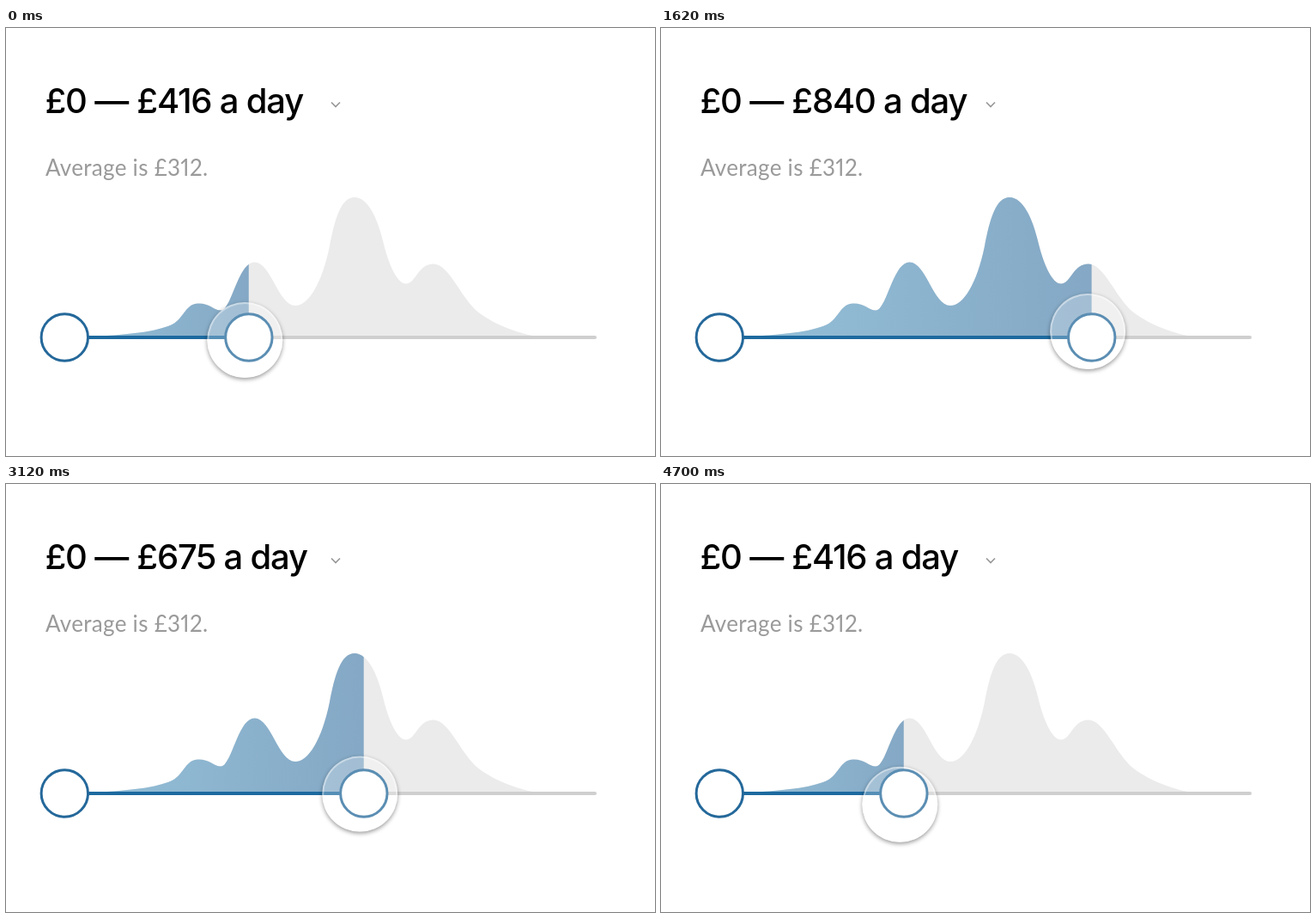
Write an HTML page that moves like this. It is 756 px wide and 498 px high and loops after 4720 ms.

```html
<!DOCTYPE html>
<html lang="en">
<head>
<meta charset="utf-8">
<title>Price range slider</title>
<style>
  html, body { margin: 0; width: 100%; height: 100%; overflow: hidden; background: #fff; }
  svg { position: absolute; left: 0; top: 0; }
  .price { font: 500 40px Inter, sans-serif; letter-spacing: -1.2px; }
  .average {
    font: 400 26px Lato, sans-serif; letter-spacing: .3px;
    font-variant-numeric: proportional-nums; fill: #9a9a9a;
  }
  .knob { fill: #fff; stroke: #24689a; stroke-width: 3; }
  #touch {
    position: absolute; left: -44px; top: -44px; width: 88px; height: 88px;
    box-sizing: border-box; border-radius: 50%;
    border: 2px solid rgba(255, 255, 255, .4);
    background: rgba(255, 255, 255, .25);
    box-shadow: 0 2px 5px rgba(0, 0, 0, .4);
  }
</style>
</head>
<body>
<svg width="756" height="498" viewBox="0 0 756 498">
  <defs>
    <path id="hills" d="M68 360L100 358.5C150 356 180 352 196 343C207 336 210 320 224 320
      S242 328 250 328C263 328 270 272 289.5 272S317 322.5 337 322.5
      C352 322.5 368 297 377 253C383 222 390 196.5 406 196.5S433 222 439 247
      S455 297 466 297S480 274 498 274S530 314 550 330S605 358 630 360Z"/>
    <clipPath id="range"><rect id="window" x="68" y="180" height="182"/></clipPath>
    <linearGradient id="blue" gradientUnits="userSpaceOnUse" x1="68" x2="283">
      <stop stop-color="#95c1d9"/>
      <stop offset="1" stop-color="#84a8c5"/>
    </linearGradient>
  </defs>

  <text class="price" x="45.5" y="99.3">£0 —</text>
  <text class="price" x="152.3" y="99.3" id="price"></text>
  <path d="M379 86.5l5 5 5-5" fill="none" stroke="#999" stroke-width="1.7"/>
  <text class="average" x="46" y="171.5">Average is £312.</text>

  <use href="#hills" y=".6" fill="#ebebeb"/>
  <use href="#hills" y=".6" fill="url(#blue)" clip-path="url(#range)"/>
  <path d="M68 360H686" stroke="#cfcfcf" stroke-width="4" stroke-linecap="round"/>
  <path id="track" stroke="#1d6a9f" stroke-width="4"/>
  <circle class="knob" cx="68.3" cy="360" r="27.2"/>
  <circle class="knob" id="knob" cy="360" r="27.2"/>
</svg>
<div id="touch"></div>

<script>
const LOOP = 4720, LOW = 416, HIGH = 853;
const LEFT = 68.1, PIXELS_PER_POUND = 1 / 1.937;
const $ = id => document.getElementById(id);

const progress = (t, from, to) => Math.min(1, Math.max(0, (t - from) / (to - from)));
const easeInOut = s => (1 - Math.cos(Math.PI * s)) / 2;
const easeOut = s => 1 - (1 - s) ** 2.23;

function draw(t) {
  // Drag right, hold, then drag back while slowing down.
  const out = easeInOut(progress(t, 545, 1755));
  const back = easeOut(progress(t, 2700, LOOP));
  const price = LOW + (HIGH - LOW) * (out - back);
  const x = LEFT + price * PIXELS_PER_POUND;

  // The finger lifts a little on the way out and sinks steadily on the way back.
  const y = 363 - 10 * easeInOut(progress(t, 600, 1500)) + 20 * progress(t, 2150, LOOP);

  $('price').textContent = `£${Math.round(price)} a day`;
  $('window').setAttribute('width', x - LEFT);
  $('blue').setAttribute('x2', x);
  $('track').setAttribute('d', `M68 360H${x}`);
  $('knob').setAttribute('cx', x);
  $('touch').style.transform = `translate(${x - 4.6}px, ${y}px)`;
}

const start = performance.now();
function frame() {
  draw((performance.now() - start) % LOOP);
  requestAnimationFrame(frame);
}
frame();
</script>
</body>
</html>
```
